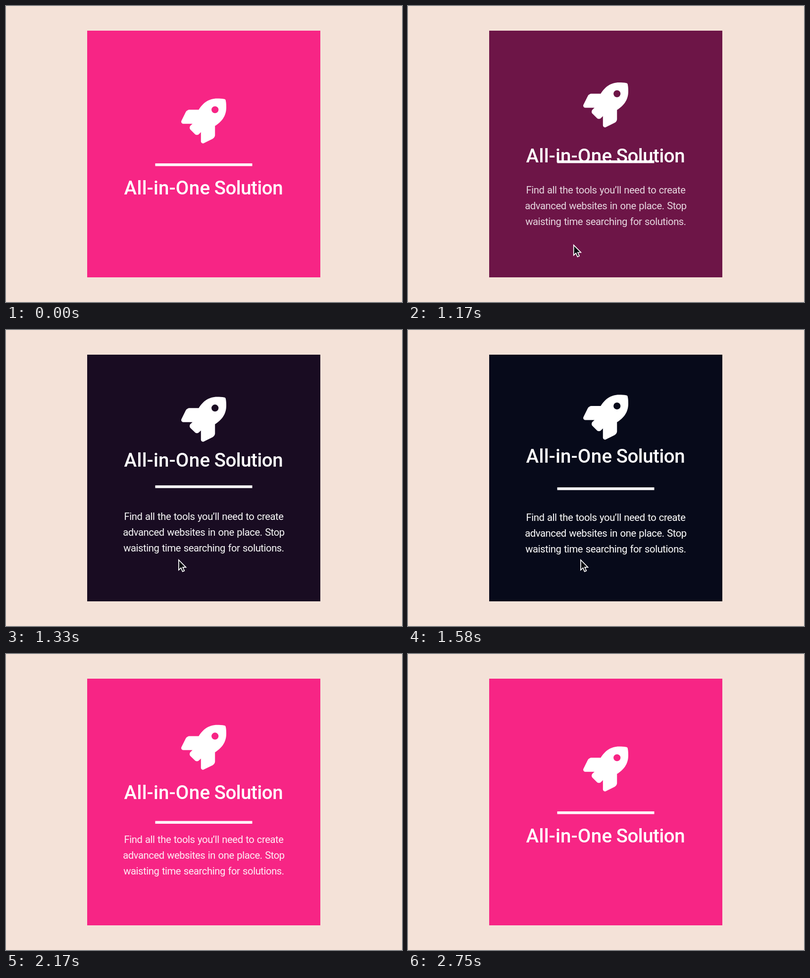
These frames come from a looping animation (800x600 px, 5 s). An HTML page:

```html
<!DOCTYPE html>
<html lang="en">
<head>
<meta charset="utf-8">
<title>Hover card</title>
<style>
  html, body { margin: 0; width: 100%; height: 100%; overflow: hidden; background: #f4e2d8; }
  svg { display: block; width: 100vw; height: 100vh; }
  text { font-family: Roboto, "Open Sans", sans-serif; fill: #fff; }
  #title { font-size: 38.5px; font-weight: 500; }
  #copy text { font-size: 20.2px; letter-spacing: -.42px; word-spacing: 1px; text-anchor: middle; }
</style>
</head>
<body>
<svg viewBox="0 0 800 600">
  <rect width="800" height="600" fill="#f4e2d8"/>
  <rect id="card" x="164" y="50" width="471" height="500"/>
  <g id="rocket">
    <path transform="translate(354 187.5) scale(.1777)" fill="#fff" fill-rule="evenodd"
      d="M505 19C504 14 498 8 493 7C461 0 435 0 410 0C307 0 245 55 199 128H95C78 128 59 140 52 154L3 253Q0 258 0 264A24 24 0 0 0 24 288H128L105 310C94 322 92 343 105 356L156 406C167 417 188 419 201 406L224 384V488A24 24 0 0 0 248 512Q253 512 258 509L357 460C372 453 384 434 384 417V313C456 266 512 204 512 102C512 76 512 51 505 19ZM384 168A40 40 0 1 1 384 88A40 40 0 1 1 384 168Z"/>
  </g>
  <g id="title">
    <text y="381.5"><tspan x="238.5" letter-spacing=".35">All-in-One</tspan><tspan x="420.7" letter-spacing="-.5">Solution</tspan></text>
  </g>
  <rect id="rule" x="301.5" y="319" width="196" height="5.5" fill="#fff"/>
  <g id="copy">
    <text x="399.5" y="386.5">Find all the tools you’ll need to create</text>
    <text x="399.5" y="418.5">advanced websites in one place. Stop</text>
    <text x="399.5" y="450.5">waisting time searching for solutions.</text>
  </g>
  <path id="cursor" d="M0 0V20.5L4.6 16.2L7.8 23.6L11.4 22L8.2 14.8H14.5Z"
    fill="#05060c" stroke="#fff" stroke-width="1.7" stroke-linejoin="miter"/>
</svg>
<script>
  const LOOP = 5000, FPS = 12;
  const ENTER = 12, LEAVE = 25, CURSOR_STEPS = 4;
  const RISE = 56.25, COPY_DROP = 15.6;
  const PINK = [247, 37, 133], DARK = [7, 10, 26];
  const $ = id => document.getElementById(id);
  const lerp = (a, b, p) => a + (b - a) * p;
  const clamp = x => Math.min(1, Math.max(0, x));

  function bezier(x1, y1, x2, y2) {
    const at = (a, b, s) => 3 * (1 - s) ** 2 * s * a + 3 * (1 - s) * s * s * b + s ** 3;
    return x => {
      if (x <= 0) return 0;
      if (x >= 1) return 1;
      let lo = 0, hi = 1;
      for (let i = 0; i < 30; i++) {
        const mid = (lo + hi) / 2;
        if (at(x1, x2, mid) < x) lo = mid; else hi = mid;
      }
      return at(y1, y2, lo);
    };
  }
  const ease = bezier(.25, .1, .25, 1);
  const windUp = bezier(.28, -.6, .1, 1);

  const move = (id, x, y) => $(id).setAttribute("transform", `translate(${x} ${y})`);

  function draw(ms) {
    // The motion advances in twelfths of a second.
    const step = Math.floor((ms + 5) * FPS / 1000);
    const hover = step >= ENTER && step < LEAVE;
    const leaving = step >= LEAVE;
    const t = (step - (leaving ? LEAVE : ENTER)) / FPS;

    const p = leaving ? 1 - ease(t / .5) : ease(t / .5);
    const q = leaving ? 1 - windUp(t / .667) : ease(t / .6);

    const tint = hover ? p : 0;
    const rgb = PINK.map((c, i) => Math.round(lerp(c, DARK[i], tint)));
    $("card").setAttribute("fill", `rgb(${rgb})`);

    move("rocket", 0, -RISE * p);
    move("title", 0, -2 * RISE * p);
    move("rule", 0, RISE * (q - p));
    move("copy", 0, -COPY_DROP * (1 - p));
    $("copy").setAttribute("opacity", Math.cbrt(p));

    const c = 1 - (1 - clamp((step - ENTER) / CURSOR_STEPS)) ** 1.55;
    move("cursor", lerp(307.3, 348.9, c), lerp(520.7, 466, c));
    $("cursor").setAttribute("visibility", hover ? "visible" : "hidden");
  }

  const start = performance.now();
  function tick() {
    draw((performance.now() - start) % LOOP);
    requestAnimationFrame(tick);
  }
  tick();
</script>
</body>
</html>
```
